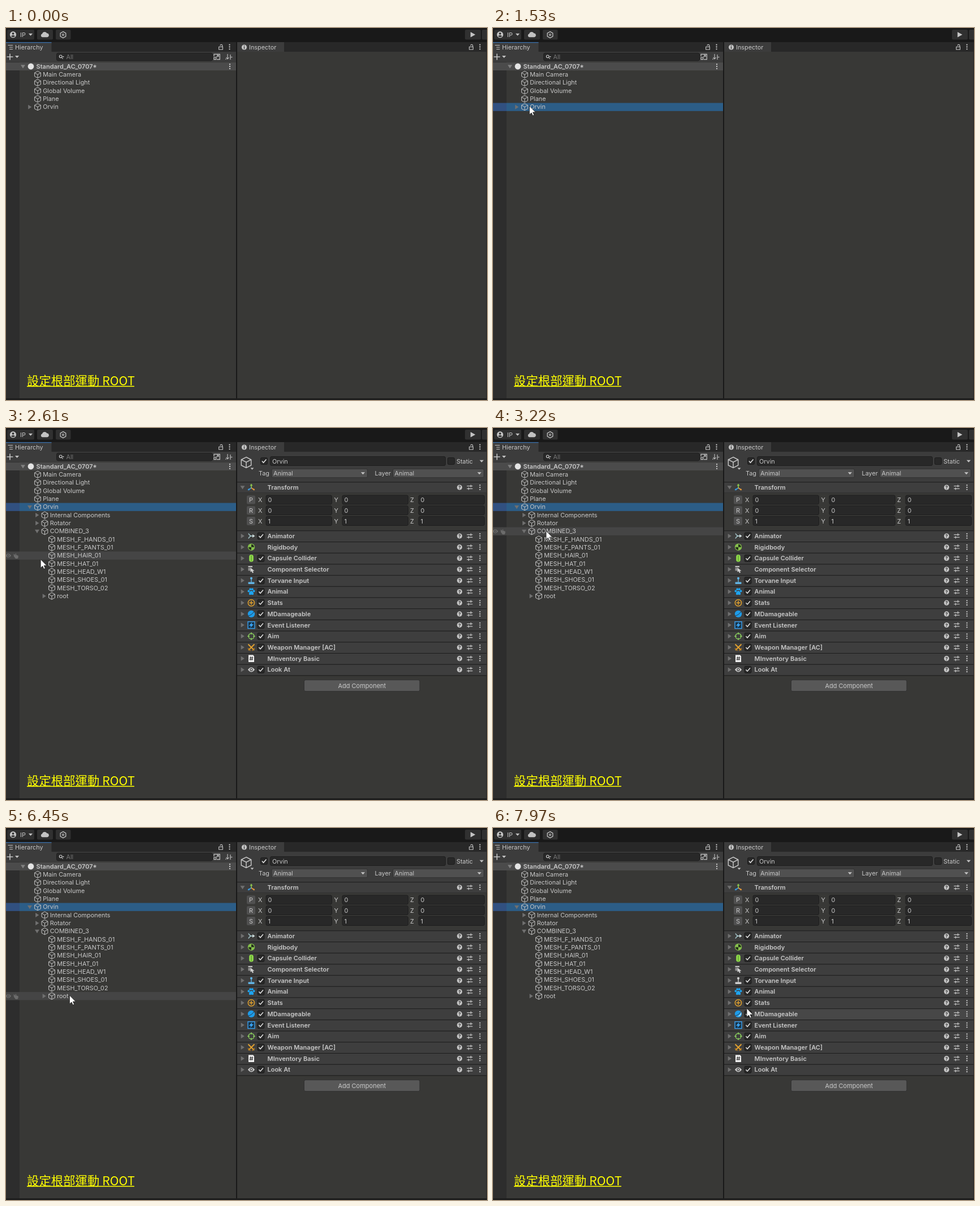
Animation, 851 px wide and 658 px high, one loop 8000 ms. Source, as an HTML page:

```html
<!DOCTYPE html>
<html lang="zh-Hant">
<head>
<meta charset="utf-8">
<title>Root setup</title>
<style>
html, body { margin: 0; width: 100%; height: 100%; overflow: hidden; background: #383836; }
svg { display: block; width: 851px; height: 658px; }
text { font-family: Inter, sans-serif; font-size: 10.85px; fill: #c8c8c8; white-space: pre; }
.b { font-weight: 600; font-size: 11px; }
.title { font-family: "Noto Sans CJK TC", "Noto Sans CJK", sans-serif; font-size: 21.4px; font-weight: 300; fill: #ffff00; }
</style>
</head>
<body>
<svg id="stage" viewBox="0 0 851 658" xmlns="http://www.w3.org/2000/svg"></svg>
<script>
const LOOP = 8000, ROW = 14.32, TOP = 75.2, COMP = 19.7, COMP_TOP = 181.3;
const LIGHT = '#c4c4c4', DARK = '#1b1b1b';

const rect = (x, y, w, h, fill, extra = '') =>
  `<rect x="${x}" y="${y}" width="${w}" height="${h}" fill="${fill}" ${extra}/>`;
const text = (x, y, s, extra = '') => `<text x="${x}" y="${y}" ${extra}>${s}</text>`;
const line = (d, color = LIGHT, w = 1.1, extra = '') =>
  `<path d="${d}" fill="none" stroke="${color}" stroke-width="${w}" ${extra}/>`;
const fill = (d, color = LIGHT, extra = '') => `<path d="${d}" fill="${color}" ${extra}/>`;
const disc = (x, y, r, color = LIGHT) => `<circle cx="${x}" cy="${y}" r="${r}" fill="${color}"/>`;
const ring = (x, y, r, color = LIGHT, w = 1.2) =>
  `<circle cx="${x}" cy="${y}" r="${r}" fill="none" stroke="${color}" stroke-width="${w}"/>`;
const at = (x, y, s, k = 1, attr = '') => `<g transform="translate(${x} ${y}) scale(${k})" ${attr}>${s}</g>`;

const cube = (x, y, k = 1) => at(x, y, line(
  'M0-6L5.4-3.2V3.2L0 6L-5.4 3.2V-3.2ZM-5.4-3.2L0 0L5.4-3.2M0 0V6', LIGHT, 1), k);
const arrow = (x, y, open, color = '#707070') =>
  fill(open ? `M${x - 4} ${y - 2.8}h8l-4 6.4z` : `M${x - 2.8} ${y - 4}v8l6.2-4z`, color);
const caret = (x, y) => fill(`M${x - 3.6} ${y - 1.8}h7.2l-3.6 4z`);
const kebab = (x, y) => [-3.8, 0, 3.8].map(d => disc(x, y + d, 1.15, '#d0d0d0')).join('');
const lock = (x, y) => rect(x - 3.4, y - .6, 6.8, 4.6, 'none', `stroke="${LIGHT}" stroke-width="1.1"`) +
  line(`M${x - 1} ${y - 2.6}q0-2 1.9-2t1.9 2v2`);
const check = (x, y, on = true) =>
  rect(x - 6, y - 6, 12, 12, '#282828', `rx="2" stroke="${DARK}" stroke-width="1"`) +
  (on ? line(`M${x - 3.6} ${y}l2.6 2.8 5-5.8`, '#e2e2e2', 1.5) : '');
const field = (x, y, w, s = '') =>
  rect(x, y - 8, w, 16, '#282828', 'rx="2.5" stroke="#1e1e1e" stroke-width="1"') + text(x + 3.5, y + 4, s);
const drop = (x, y, w, s) =>
  rect(x, y - 7.7, w, 15.4, '#505050', 'rx="2.5" stroke="#303030" stroke-width="1"') +
  text(x + 3, y + 4, s) + caret(x + w - 8, y);
const tools = y => disc(802.5, y, 4.6) + text(802.5, y + 3, '?',
    'text-anchor="middle" style="font-size:8px;font-weight:700;fill:#333"') +
  line(`M815.5 ${y - 2.3}h10M815.5 ${y + 2.3}h10M822.5 ${y - 4.6}v4.4M818.5 ${y + .2}v4.4`, LIGHT, 1.2) +
  kebab(838.5, y);
const eye = (x, y, k, color) => at(x, y,
  fill('M-6 0Q0-8 6 0Q0 8-6 0Z', color) + disc(0, 0, 2.6, '#3c3c3c') + disc(0, 0, 1.4, color), k);

const toolbar = () => {
  const button = (x, w) => rect(x, 3, w, 17.5, '#303030', 'rx="2"');
  return rect(0, 0, 851, 25, '#191919') +
    button(2, 48) + button(55, 28) + button(88, 26.5) + button(812, 28) + button(842, 12) +
    disc(12.5, 11.7, 5.6) + disc(12.5, 9.8, 1.9, '#303030') + fill('M8.9 14.6q3.6-3.6 7.2 0q-3.6 3-7.2 0z', '#303030') +
    text(25, 15.6, 'IP') + caret(43.5, 11.5) +
    fill('M64.5 16.2a3 3 0 0 1-.4-5.9a4.4 4.4 0 0 1 8.2-1a3.5 3.5 0 0 1 .9 6.9z') +
    line('M101 6.4l4.8 2.8v5.6l-4.8 2.8l-4.8-2.8v-5.6z', LIGHT, 1.3) + ring(101, 12, 1.5, LIGHT, 1.2) +
    fill('M821.8 7v9.6l8.6-4.8z');
};

const panels = () => rect(0, 25, 851, 17, '#282828') +
  rect(0, 25, 80.5, 17, '#3c3c3c') + rect(0, 25, 80.5, 1.3, '#3a6ea8') +
  line('M3.5 30.5h4M6 34h6M6 37.5h6M7.5 30.5h4.5', LIGHT, 1.1) + text(16, 38.3, 'Hierarchy') +
  lock(380, 34) + kebab(395.5, 33.5) +
  rect(0, 42, 407, 18.5, '#3c3c3c') +
  line('M1.5 51h11M7 45.5v11', LIGHT, 1.6) + caret(19.5, 50.8) +
  rect(89.5, 44.3, 276, 13.6, '#282828', 'rx="3" stroke="#1e1e1e" stroke-width="1"') +
  ring(96.7, 50.3, 2.3) + line('M98.4 52l2.4 2.6') + fill('M99.6 50h3.4l-1.7 2z') +
  text(106.5, 54.8, 'All', 'style="fill:#757575"') +
  line('M368 50V46.3h10.3v9.4H373M368 52h3.6v3.7H368zM372.4 51.4l3.4-3.2M373 48h3v3', LIGHT, 1.2) +
  line('M392 46v8.5M389.5 52l2.5 3 2.5-3M388 55h2M397 47v9M397 51.5h3.5', LIGHT, 1.1) +
  rect(0, 60.5, 24, 595, '#2d2d2d') +
  rect(0, 61, 407, 14, '#4b4b4b') +
  arrow(30, 68, true, '#808080') + disc(44, 68, 5.4, '#e4e4e4') +
  text(53.5, 72, 'Standard_AC_0707*', 'class="b"') + kebab(396, 68);

const rightFrame = () => rect(407, 25, 2, 631, '#191919') +
  rect(409, 25, 83, 17, '#3c3c3c') +
  disc(421.5, 34, 4.6) + rect(420.8, 33.2, 1.4, 3.6, '#333') + rect(420.8, 30.9, 1.4, 1.4, '#333') +
  text(430, 38.3, 'Inspector') + lock(823, 34) + kebab(838.5, 33.5) +
  rect(849.8, 25, 1.2, 631, '#242424') + rect(0, 655, 851, 3, '#1d1d1d');

// name, depth, arrow (0 none, 1 closed, 2 open)
const tree = [
  ['Main Camera', 0, 0], ['Directional Light', 0, 0], ['Global Volume', 0, 0], ['Plane', 0, 0], ['Orvin', 0, 1],
  ['Internal Components', 1, 1], ['Rotator', 1, 1], ['COMBINED_3', 1, 2],
  ...['F_HANDS_01', 'F_PANTS_01', 'HAIR_01', 'HAT_01', 'HEAD_W1', 'SHOES_01', 'TORSO_02'].map(s => ['MESH_' + s, 2, 0]),
  ['root', 2, 1]
];
const rowY = i => 82.4 + ROW * i;
const treeRow = ([name, depth, kind], i) => {
  const x = 56 + depth * 12.5, y = rowY(i);
  const tip = !kind ? '' : i === 4
    ? `<g id="shut">${arrow(42, y, false)}</g><g id="open">${arrow(42, y, true)}</g>`
    : arrow(x - 13.5, y, kind === 2);
  return tip + cube(x, y) + text(x + 9.2, y + 3.7, name);
};

const icons = [
  line('M-5-4.5Q-3 0 1 0H4M-5 4.5Q-3 0 1 0', '#a9cbd0', 1.4) + fill('M2-3l4.5 3L2 3z', '#d0dcdc'),
  disc(0, 0, 6.2, '#86c04c') + fill('M0 0V-5A5 5 0 0 1 5 0ZM0 0V5A5 5 0 0 1-5 0Z', '#24301c'),
  rect(-3.8, -6.3, 7.6, 12.6, '#8fdc4a', 'rx="3.8"') + line('M0-5V5', '#4f7d2c', 1),
  rect(-5.5, -6, 7.5, 2.2, LIGHT) + rect(-5.5, -2.6, 4, 5, '#909090') + fill('M-1.5-3V5l2-1.8L2 6.5l2-.9L2.5 2.6H5.5z', '#d4d4d4'),
  '<g id="stick">' + disc(0, -4, 2.1, 'currentColor') + rect(-.7, -3, 1.4, 6, 'currentColor') +
    rect(-5.5, 2.6, 11, 3.6, 'currentColor', 'rx="1"') + '</g>',
  [[-4.6, -1], [-1.8, -4.3], [1.8, -4.3], [4.6, -1]].map(p => disc(...p, 1.9, '#1ea4f0')).join('') +
    fill('M0-1.5Q2.3-1.5 4 2.5Q4.8 6 1.8 5.6Q0 4.8-1.8 5.6Q-4.8 6-4 2.5Q-2.3-1.5 0-1.5Z', '#1ea4f0'),
  ring(0, 0, 5.7, '#e0a02c', 1.5) + line('M0-3.6V3.6M-3.6 0H3.6', '#e0a02c', 1.5),
  disc(0, 0, 6.2, '#1e9be8') + line('M-5.4 3.3Q1 2 4.8-4.2', '#2b3a44', 1) +
    `<g id="gleam">${fill('M-1.5 4.5Q4 2 4.6-4Q7 4-1.5 4.5z', '#c8dce4')}</g>`,
  rect(-6, -6, 12, 12, '#183448', 'stroke="#3aa0f0" stroke-width="1.4"') + fill('M1.5-5L-4 1.2H-.6L-1.8 5L4-1.3H.6z', '#3aa8ff'),
  ring(0, 0, 5, '#8fd860', 1.3) + line('M0-6.8V-3M0 6.8V3M-6.8 0H-3M6.8 0H3', '#8fd860', 1.3),
  line('M-5.5-5.5L5 5M5.5-5.5L-5 5', '#e0a030', 2) + line('M-6 1.5l4.5 4.5M6 1.5l-4.5 4.5', '#b87c20', 1.4),
  fill('M-5-6.2H3L5-4.2V6.2H-5Z', '#f0f0f0') + line('M-1.2-3.5l-.8 7M1.8-3.5l-.8 7M-3-1.4H3.4M-3.3 1.4H3', '#333', 1.1),
  eye(0, 0, 1, '#d0d0d0')
];
const parts = ['Animator', '-Rigidbody', 'Capsule Collider', '-Component Selector', 'Torvane Input', 'Animal', 'Stats',
  'MDamageable', 'Event Listener', 'Aim', 'Weapon Manager [AC]', '-MInventory Basic', 'Look At'];

const partRow = (s, i) => {
  const top = COMP_TOP + i * COMP, y = top + 9.7, plain = s[0] === '-';
  return rect(409, top, 441, COMP, '#3e3e3e', `id="part${i}"`) + rect(409, top, 441, 1, DARK) +
    arrow(418.5, y, false) + at(434, y, icons[i]) + (plain ? '' : check(451, y)) +
    text(462.5, y + 3.9, s.replace('-', ''), 'class="b"') + tools(y);
};

const vector = (name, y, v) => rect(426, y - 7.5, 15, 15, '#505050', 'rx="2"') +
  text(433.5, y + 4, name, 'text-anchor="middle"') +
  ['X', 'Y', 'Z'].map((a, i) => text(446 + i * 134.5, y + 4, a) + field(460 + i * 135, y, 116.5, v)).join('');

const inspector = () => rect(409, 42, 441, 54, '#3c3c3c') +
  at(425, 61, line('M0-9.5L8.7-5V5L0 9.5L-8.7 5V-5ZM-8.7-5L0-.5L8.7-5M0-.5V9.5', LIGHT, 1.5)) +
  fill('M432.5 70.5h6l-3 3.3z') +
  check(456.5, 58.5) + field(467.5, 58.5, 310, 'Orvin') + check(787.5, 58.5, false) + text(797, 62.5, 'Static') + caret(841.5, 58.5) +
  text(447, 84, 'Tag') + drop(470, 80, 169.5, 'Animal') + text(652.5, 84, 'Layer') + drop(684.5, 80, 161, 'Animal') +
  rect(409, 95.3, 441, 19, '#3e3e3e') + rect(409, 95.3, 441, 1, DARK) + rect(409, 114, 441, .8, '#303030') +
  arrow(418.5, 105, true) +
  line('M434 106V101', '#8cc850', 1.7) + fill('M431.5 102l2.5-3.6 2.5 3.6z', '#8cc850') +
  line('M434 106l-4 2.5', '#3a9ee8', 1.7) + fill('M431 110.2l-3.4-.2 1.6-3.2z', '#3a9ee8') +
  line('M434 106l4 2.5', '#e89a3c', 1.7) + fill('M437 110.2l3.4-.2-1.6-3.2z', '#e89a3c') +
  text(462.5, 109, 'Transform', 'class="b"') + tools(105) +
  vector('P', 127, '0') + vector('R', 145.7, '0') + vector('S', 164.5, '1') +
  parts.map(partRow).join('') + rect(409, COMP_TOP + 13 * COMP, 441, 1, DARK) +
  rect(527.5, 445.7, 204.5, 20, '#585858', 'rx="2.5" stroke="#303030" stroke-width="1"') +
  text(629.8, 459.5, 'Add Component', 'text-anchor="middle" style="font-size:11px"');

const stage = document.getElementById('stage');
stage.innerHTML = rect(0, 0, 851, 658, '#383836') + toolbar() + panels() +
  `<g id="hover">${rect(0, 0, 407, 14.3, '#454545')}${eye(4, 7.2, .85, '#6c6c6c')}` +
  fill('M13.5 4l2 1.2 1.2 2V3.6h1.4v2.6l3.6 1v3l-1.2 2.4h-3.6l-3-4z', '#6c6c6c') + '</g>' +
  `<g id="picked">${rect(0, rowY(4) - 7.1, 24, 14.3, '#315080')}${rect(24, rowY(4) - 7.1, 383, 14.3, '#2c5d87')}</g>` +
  tree.slice(0, 5).map(treeRow).join('') +
  `<g id="kids">${tree.slice(5).map((r, i) => treeRow(r, i + 5)).join('')}</g>` +
  rightFrame() + `<g id="inspector">${inspector()}</g>` +
  text(37, 631.5, '設定根部運動 ROOT', 'class="title"') + rect(37, 633, 190, 1.5, '#ffff00') +
  `<g id="cursor">${fill('M0 0V15.2L3.5 12L5.8 17L8.2 16L6 11H10.8Z', '#fff', 'stroke="#222" stroke-width=".8"')}</g>`;

const el = {};
for (const n of stage.querySelectorAll('[id]')) el[n.id] = n;
const show = (n, on) => n.setAttribute('visibility', on ? 'inherit' : 'hidden');

// time, x, y of the pointer tip
const path = [
  [490, 599, 511], [700, 400, 370], [900, 160, 205], [1050, 72, 143], [1120, 64.5, 138],
  [1600, 64.5, 138], [1740, 44, 139], [1930, 44, 139], [2000, 43, 139], [2470, 43, 139],
  [2610, 61, 232], [2720, 84, 271], [2850, 138, 248], [2960, 146, 208], [3090, 112, 184], [3220, 94, 182],
  [4100, 94, 182], [4240, 148, 238], [4380, 98, 296.5], [4760, 98, 296.5], [4910, 104, 296.5],
  [5970, 104, 296.5], [6140, 117, 299], [6300, 100, 296], [6450, 112.5, 296], [6520, 112.5, 296], [6660, 100, 296],
  [6800, 100, 296], [6860, 98, 296], [7060, 98, 296], [7300, 220, 300], [7560, 400, 314], [7820, 462, 311],
  [7890, 462, 311], [7970, 449, 319], [8000, 449, 319]
];
const tipAt = t => {
  const i = path.findIndex(p => p[0] > t), [t0, x0, y0] = path[i - 1], [t1, x1, y1] = path[i];
  const k = (t - t0) / (t1 - t0);
  return [x0 + (x1 - x0) * k, y0 + (y1 - y0) * k];
};

function draw(t) {
  const seen = t >= 490, picked = t >= 1460, details = t >= 1600, open = t >= 2200;
  const [x, y] = seen ? tipAt(t) : [-50, -50];
  const row = Math.floor((y - TOP) / ROW);
  const over = x >= 0 && x < 407 && row >= 0 && row < (open ? tree.length : 5);
  show(el.cursor, seen);
  el.cursor.setAttribute('transform', `translate(${x} ${y})`);
  show(el.picked, picked);
  show(el.inspector, details);
  show(el.kids, open);
  show(el.open, open);
  show(el.shut, !open);
  show(el.hover, over && !(picked && row === 4));
  el.hover.setAttribute('transform', `translate(0 ${rowY(row) - 7.1})`);
  const part = x > 409 ? Math.floor((y + 1.5 - COMP_TOP) / COMP) : -1;
  parts.forEach((_, i) => el['part' + i].setAttribute('fill', i === part ? '#474747' : '#3e3e3e'));
  el.stick.setAttribute('color', t < 7560 ? '#62b4e4' : '#d0d0d0');
  show(el.gleam, details && t >= 7560);
}

const start = performance.now();
function tick(now) {
  draw(Math.max(0, now - start) % LOOP);
  requestAnimationFrame(tick);
}
draw(0);
requestAnimationFrame(tick);
</script>
</body>
</html>
```
